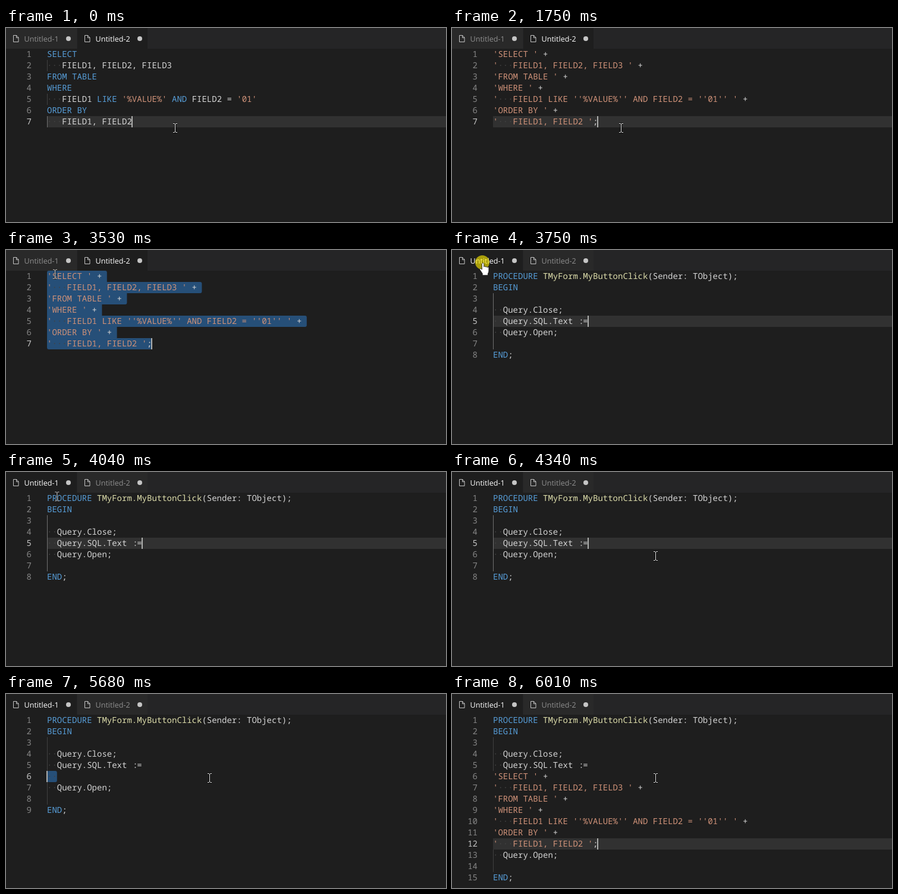
Recreate the animation shown at these times as an HTML page. Size 740 by 328 pixels, loop 7480 ms.

```html
<!DOCTYPE html>
<html lang="en">
<head>
<meta charset="utf-8">
<title>Query to string</title>
<style>
  html, body { margin: 0; width: 100%; height: 100%; overflow: hidden; background: #1e1e1e; }
  svg { display: block; }
  .code { font: 500 14px "Noto Sans Mono", "DejaVu Sans Mono", monospace; fill: #d4d4d4;
          white-space: pre; text-rendering: geometricPrecision; }
  .tab { font: 12.6px "Open Sans", "Noto Sans", sans-serif; fill: #8f8f8f; text-rendering: geometricPrecision; }
  .tab.on { fill: #fff; }
  .num { fill: #858585; font-weight: 400; text-anchor: end; }
  .num.on { fill: #c6c6c6; }
  .str { fill: #ce9178; }
  .key { fill: #569cd6; }
  .fn { fill: #dcdcaa; }
  .dot { fill: #434343; }

  #pointer { animation: travel 7480ms infinite; }
  #beam { animation: beam 7480ms step-end infinite; }
  #hand { animation: hand 7480ms step-end infinite; }
  #click { animation: click 7480ms step-end infinite; }

  @keyframes travel {
    0% { transform: translate(284px, 169px); animation-timing-function: linear; }
    42.914% { transform: translate(284px, 169px); animation-timing-function: ease-in-out; }
    48.663% { transform: translate(51px, 21px); animation-timing-function: linear; }
    50.936% { transform: translate(51px, 21px); animation-timing-function: ease-in; }
    52.941% { transform: translate(59px, 31px); animation-timing-function: ease-in-out; }
    58.021%, 100% { transform: translate(342px, 142px); }
  }
  @keyframes beam {
    0% { visibility: visible; }
    47.393% { visibility: hidden; }
    53.65%, 100% { visibility: visible; }
  }
  @keyframes hand {
    0% { visibility: hidden; }
    47.393% { visibility: visible; }
    53.65%, 100% { visibility: hidden; }
  }
  @keyframes click {
    0% { visibility: hidden; }
    49.198% { visibility: visible; }
    51.337%, 100% { visibility: hidden; }
  }
</style>
</head>
<body>
<svg width="740" height="328" viewBox="0 0 740 328">
  <g id="scenes"></g>
  <g id="pointer">
    <circle id="click" r="12" fill="#fe0" opacity=".62"/>
    <g id="beam" fill="none">
      <path d="M-3 -7.5H-1L.5 -6.5L2 -7.5H4M.5 -6.5V6.5M-3 7.5H-1L.5 6.5L2 7.5H4" stroke="#000" stroke-width="3" opacity=".6"/>
      <path d="M-3 -7.5H-1L.5 -6.5L2 -7.5H4M.5 -6.5V6.5M-3 7.5H-1L.5 6.5L2 7.5H4" stroke="#e8e8e8"/>
    </g>
    <path id="hand" transform="translate(-4.5 .5)" fill="#fff" stroke="#111" stroke-width=".8"
      d="M5.5 .5c-1.1 0-1.7.8-1.7 1.8v9.2l-1-1.1c-.7-.8-1.8-.8-2.3-.1s-.3 1.3.2 2l4 6v3h9.2v-3c1-1.6 1.5-3.2 1.5-5V9c0-2-2.4-2.3-2.8-.9 0-1.9-2.6-2.2-2.8-.6 0-1.8-2.4-2.1-2.6-.5V2.3C7.2 1.3 6.6.5 5.5.5z"/>
  </g>
</svg>
<script>
const LOOP = 7480, LEFT = 69, TOP = 35, ROW = 19, CHAR = 8.4;

const sql = [
  "SELECT", "   FIELD1, FIELD2, FIELD3", "FROM TABLE", "WHERE",
  "   FIELD1 LIKE '%VALUE%' AND FIELD2 = '01'", "ORDER BY", "   FIELD1, FIELD2"
];
const quoted = sql.map((line, i) =>
  `'${line.replace(/'/g, "''")} '` + (i < sql.length - 1 ? " +" : ";"));
const unit = (...added) => [
  "PROCEDURE TMyForm.MyButtonClick(Sender: TObject);", "BEGIN", "",
  "  Query.Close;", "  Query.SQL.Text :=", ...added, "  Query.Open;", "", "END;"
];

// caret: [line, column]; guides: [first line, last line, active]; sel: [line, columns]
const scenes = [
  { at: 0, tab: 2, lines: sql, caret: [7, 17], guides: [[2, 2], [5, 5], [7, 7, true]] },
  { at: 1750, tab: 2, lines: quoted, caret: [7, 21] },
  { at: 2730, tab: 2, lines: quoted, caret: [7, 21],
    sel: quoted.map((line, i) => [i + 1, line.length + (i < 6 ? 1 : 0)]) },
  { at: 3740, tab: 1, lines: unit(), caret: [5, 19], guides: [[3, 7, true]] },
  { at: 5010, tab: 1, lines: unit("  "), caret: [6, 2], guides: [[3, 8, true]] },
  { at: 5680, tab: 1, lines: unit("  "), caret: [6, 0], guides: [[3, 8]], sel: [[6, 2]] },
  { at: 6010, tab: 1, lines: unit(...quoted), caret: [12, 21], guides: [[3, 5], [13, 14]] }
];

const rowY = n => TOP + ROW * (n - 1);
const colX = n => LEFT + CHAR * n;
const rect = (x, y, w, h, fill) => `<rect x="${x}" y="${y}" width="${w}" height="${h}" fill="${fill}"/>`;
const span = (cls, text) => `<tspan class="${cls}">${text}</tspan>`;

const tokens = /('(?:''|[^'])*')|\b(PROCEDURE|BEGIN|END|SELECT|FROM|TABLE|WHERE|LIKE|AND|ORDER BY)\b|(TMyForm\.MyButtonClick)/g;

function paint(line) {
  return line
    .replace(tokens, (text, str, key) => span(str ? "str" : key ? "key" : "fn", text))
    .replace(/ {2,}/g, gap => span("dot", "·".repeat(gap.length)))
    .replace(":=", '<tspan dx="1.5">:</tspan><tspan dx="-1.5">=</tspan>');
}

function tab(n, on) {
  const x = (n - 1) * 120;
  return rect(x, 0, n === 1 ? 119 : 118, 35, on ? "#1e1e1e" : "#292929") +
    `<path d="M${x + 12.5} 12.5h5l3.5 3.5v7.5h-8.5zM${x + 17.5} 12.5v4h3.5" fill="none" stroke="#c5c5c5"/>` +
    `<text class="tab ${on ? "on" : ""}" x="${x + 30.5}" y="22.5">Untitled-${n}</text>` +
    `<circle cx="${x + 105}" cy="18" r="4" fill="#c5c5c5"/>`;
}

// Rounds only the corners that stick out past the neighbouring rows.
function selection(sel) {
  return sel.map(([line, cols], i) => {
    const w = cols * CHAR, r = show => show ? 3 : 0;
    const wider = other => r(!other || cols > other[1]);
    const tl = r(i === 0), bl = r(i === sel.length - 1);
    const tr = wider(sel[i - 1]), br = wider(sel[i + 1]);
    return `<path fill="#264f78" d="M${LEFT + tl} ${rowY(line)}h${w - tl - tr}q${tr} 0 ${tr} ${tr}` +
      `v${ROW - tr - br}q0 ${br} ${-br} ${br}h${br + bl - w}q${-bl} 0 ${-bl} ${-bl}` +
      `v${bl + tl - ROW}q0 ${-tl} ${tl} ${-tl}z"/>`;
  }).join("");
}

function draw({ tab: open, lines, caret: [row, col], guides = [], sel }, i) {
  const back = sel ? selection(sel) : rect(LEFT, rowY(row), 740 - LEFT, ROW, "#313131");
  const rules = guides.map(([a, b, active]) =>
    rect(LEFT, rowY(a), 1, (b - a + 1) * ROW, active ? "#707070" : "#404040"));
  const text = lines.map((line, k) => {
    const y = rowY(k + 1) + 14;
    return `<text class="code num ${k + 1 === row ? "on" : ""}" x="43" y="${y}">${k + 1}</text>` +
      `<text class="code" x="${LEFT}" y="${y}">${paint(line)}</text>`;
  });
  return `<g style="animation: scene${i} ${LOOP}ms step-end infinite">` +
    rect(0, 0, 740, 328, "#1e1e1e") + rect(0, 0, 740, 35, "#252526") +
    tab(1, open === 1) + tab(2, open === 2) + back + rules.join("") + text.join("") +
    rect(Math.round(colX(col)) - 1, rowY(row), 2, ROW, "#aeafad") + "</g>";
}

const percent = ms => Math.floor(ms / LOOP * 1e5) / 1e3 + "%";
const sheet = document.createElement("style");
sheet.textContent = scenes.map(({ at }, i) => {
  const end = i + 1 < scenes.length ? percent(scenes[i + 1].at) + ", 100% { visibility: hidden; }" : "100% { visibility: visible; }";
  const before = at ? "0% { visibility: hidden; }" : "";
  return `@keyframes scene${i} { ${before} ${percent(at)} { visibility: visible; } ${end} }`;
}).join("\n");
document.head.append(sheet);
document.getElementById("scenes").innerHTML = scenes.map(draw).join("");
</script>
</body>
</html>
```
